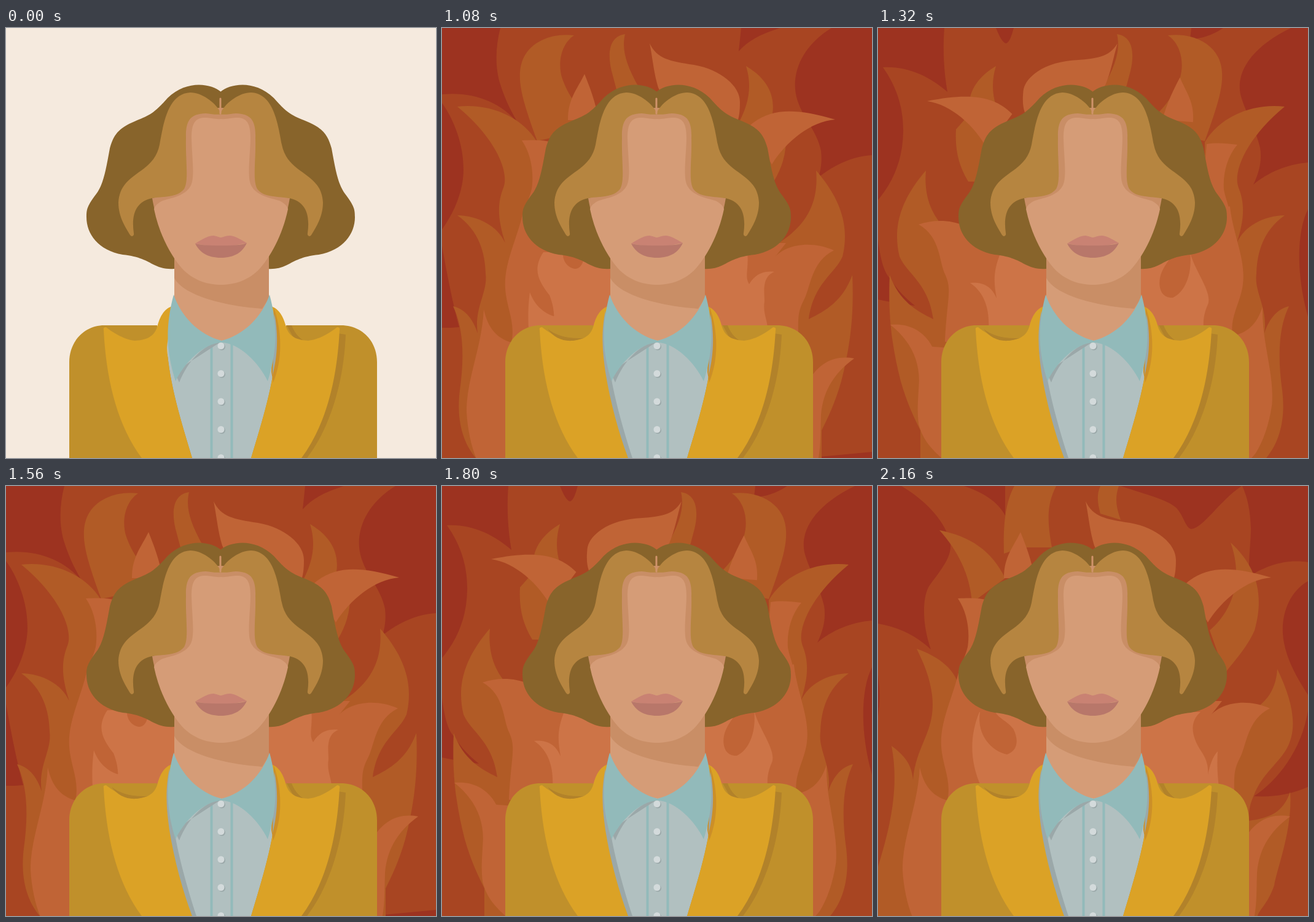
Animation, 700 px wide and 700 px high, one loop 2.28 s. Source, as an HTML page:

```html
<!DOCTYPE html>
<html lang="en">
<head>
<meta charset="utf-8">
<title>Portrait in flames</title>
<style>
html, body { margin: 0; width: 100%; height: 100%; overflow: hidden; background: #f5eade; }
svg { display: block; width: 100vw; height: 100vh; }
.base { fill: #a84522; }
.red { fill: #9d3320; }
.brown { fill: #b15b26; }
.orange { fill: #c06436; }
.light { fill: #cd7447; }
.skin { fill: #d59c77; }
.shade { fill: #c98e66; }
.collar { fill: #92baba; }
.grey { fill: #9ba8a9; }
.lapel { fill: #dba226; }
.fold { fill: #b2822a; }
</style>
</head>
<body>
<svg viewBox="0 0 700 700" preserveAspectRatio="none">
  <defs>
    <path id="hair" d="M350 104C335 91 295 83 263 114C238 143 230 143 205 154C180 165 174 178 169 196C162 235 158 255 147 270C132 290 131 295 131 308C131 335 150 362 190 369C218 372 228 379 242 386C252 391 262 393 274 392L350 330Z"/>
    <path id="fringe" d="M349 137C340 120 318 105 300 105C265 107 257 150 250 190C240 240 186 233 183 284C183 308 195 325 202 337C205 341 209 338 208 334C204 305 210 283 238 277C262 274 280 275 290 262C298 248 292 215 293 180C292 150 300 140 325 139C335 140 345 142 350 140Z"/>
    <path id="face" d="M350 130H285V265L238 277C246 325 268 372 290 395C308 412 330 418 350 418Z"/>
    <path id="glow" d="M350 148C340 149 335 146 322 146C305 147 302 160 302 180C303 215 308 245 300 258C290 275 265 277 253 282C245 287 242 290 241 295C250 338 270 374 290 395C308 412 330 418 350 418Z"/>
    <path id="lapel" d="M274 452C258 455 250 470 246 487C240 505 225 508 210 509C195 508 175 497 163 487C160 487 158 488 159 492C163 570 180 645 221 700H303C285 640 266 580 262 520C264 495 274 475 274 452Z"/>
    <path id="wing" d="M273 434C285 470 315 500 351 509V512C322 513 290 545 276 575C262 530 258 490 273 434Z"/>
  </defs>
  <g id="fire"></g>

  <use href="#hair" fill="#88642b"/>
  <use href="#hair" fill="#88642b" transform="matrix(-1 0 0 1 699 0)"/>
  <path class="skin" d="M274 360H428V480L351 520L274 480Z"/>
  <path class="shade" d="M274 360H428V440L417 457C360 453 290 437 274 407Z"/>
  <g class="shade"><use href="#face"/><use href="#face" transform="matrix(-1 0 0 1 700 0)"/></g>
  <g class="skin"><use href="#glow"/><use href="#glow" transform="matrix(-1 0 0 1 700 0)"/></g>
  <g fill="#b68540"><use href="#fringe"/><use href="#fringe" transform="matrix(-1 0 0 1 699 0)"/></g>
  <path d="M349 115V139" stroke="#cf936a" stroke-width="3" stroke-linecap="round"/>
  <path fill="#c98273" d="M308 351C322 342 330 338 338 338C345 339 347 341 350 341C353 341 357 338 364 338C372 338 380 343 392 350L350 358Z"/>
  <path fill="#b8776a" d="M308 351C320 355 380 356 392 350C385 365 372 374 350 374C328 374 315 365 308 351Z"/>

  <path fill="#c0902b" d="M103 700V544C103 510 128 484 160 484H246L300 640H400L456 484H545C580 484 604 510 604 544V700Z"/>
  <path fill="#b1c0c0" d="M262 490L351 509L440 490V520C436 580 417 640 399 700H303C285 640 266 580 262 520Z"/>
  <path class="fold" d="M540 497L553 499C550 580 525 655 490 700H475Z"/>
  <path class="fold" d="M457 484H465C469 495 475 502 483 508H470Z"/>
  <g class="lapel"><use href="#lapel"/><use href="#lapel" transform="matrix(-1 0 0 1 702 0)"/></g>
  <g id="cast">
    <path class="fold" d="M172 490C185 500 202 506 230 505C205 514 185 508 172 490Z"/>
    <path class="grey" d="M266 460C258 500 262 530 266 560C274 610 288 660 303 700H310C292 645 278 590 274 560Z"/>
  </g>
  <path fill="#cc8f28" d="M436 455C448 490 452 535 435 577L432 560Z"/>
  <path class="grey" d="M437 465C443 495 443 530 434 565Z"/>
  <path class="collar" d="M332.500 512H336.500V700H332.500ZM365.500 512H369.500V700H365.500Z"/>
  <path class="grey" d="M351 510C322 514 296 542 282 577L274 560Z"/>
  <g class="collar"><use href="#wing"/><use href="#wing" transform="matrix(-1 0 0 1 702 0)"/></g>
  <g id="buttons"></g>
</svg>
<script>
const flip = 'matrix(-1 0 0 1 687 0)';
const lean = 'matrix(-.995 -.0763 -.075 .942 728 27.5)';

const red = {
  low: 'M0 0H95C87 30 86 65 95 92C103 117 113 137 124 155C95 120 50 103 0 108ZM0 122C20 150 35 190 35 230C35 265 20 300 0 328Z' +
    'M487 0L483 38C500 18 525 8 550 0ZM634 0C585 30 568 75 577 112C585 145 610 165 617 200C619 220 616 232 613 243C640 222 668 209 700 207V0Z' +
    'M0 355C10 410 18 450 28 487C18 488 10 488 0 488ZM615 698L700 690V700H615Z',
  high: 'M0 0H108C105 40 108 75 113 104C85 80 50 62 8 64C30 95 42 130 41 170C40 215 25 250 0 280Z' +
    'M192 0C197 12 203 25 209 25C215 22 218 10 221 0ZM510 0L508 18C530 18 550 8 562 0Z' +
    'M672 0C600 35 580 80 592 115C600 140 615 165 622 195C626 220 618 240 611 255C635 235 665 222 700 219V0Z' +
    'M0 345C5 385 12 400 20 408C30 425 45 440 60 452C40 450 20 446 0 442ZM700 295C682 330 680 400 700 470Z',
  wide: 'M-13 0H38C80 25 112 60 118 95C120 120 95 145 82 165C72 185 72 225 86 266C60 242 30 227 -13 222Z' +
    'M140 0H207V48C195 25 170 10 140 0ZM395 0C440 15 470 22 485 35C498 48 500 68 510 70C530 68 555 25 592 0Z' +
    'M593 0H700V124C665 118 630 130 605 147C602 130 607 90 607 70C606 40 602 20 593 0Z' +
    'M700 155C672 170 657 205 659 240C661 275 680 310 700 340ZM612 505C650 480 690 430 700 365V490C670 503 640 507 612 505ZM0 308C4 335 3 355 0 375Z'
};

const brown = {
  tall: 'M25 128C75 122 130 143 155 186V700H55C30 670 24 630 29 590C36 540 36 490 18 453C40 458 52 478 58 497C52 455 75 430 71 400C70 365 60 330 25 305C60 306 90 322 103 350C90 310 90 285 100 260C110 235 88 180 25 128Z' +
    'M215 12C185 8 148 18 133 48C118 80 132 120 155 184L260 160C225 140 205 110 195 80C188 55 195 25 215 12Z' +
    'M298 10C270 14 270 45 276 70L284 100L320 96C300 60 292 35 298 10Z' +
    'M495 62C525 80 543 105 538 140L560 165C562 200 555 225 540 250H500L480 160C500 125 505 95 495 62Z' +
    'M609 232C655 285 662 330 652 372C640 400 605 415 597 474C625 460 652 445 668 402C671 470 664 520 650 575C640 610 628 635 618 655V700H500V380C545 350 617 325 609 232Z',
  wide: 'M100 72C150 82 185 105 207 150L153 190C150 145 130 105 100 72ZM222 0H290C275 30 275 55 283 100H235L205 110C204 75 205 30 222 0Z' +
    'M392 0H362C355 15 358 30 362 45L395 55C388 35 385 20 392 0ZM574 92C615 130 630 175 613 235C600 265 575 290 565 305L540 235C570 210 598 160 574 92Z' +
    'M63 265C100 278 128 300 132 330V700H0V620C20 555 35 490 22 423C45 440 55 455 57 478C62 420 95 400 88 340C84 310 75 290 63 265Z' +
    'M650 298C675 350 685 395 664 430C648 455 625 470 612 503C607 515 603 525 604 545C640 540 660 530 671 498C675 560 650 620 645 650C635 680 620 690 618 700H500V400C560 380 645 380 650 298Z'
};

const orange =
  'M338 25C350 50 370 54 410 60C455 68 485 95 485 120C485 135 484 145 480 155H380L352 97C345 75 343 50 338 25Z' +
  'M232 75C220 100 205 115 205 150H255C250 120 240 95 232 75ZM640 149C600 152 560 185 537 222L500 160C530 132 570 128 640 149Z' +
  'M130 183C145 205 150 235 146 262C143 275 137 285 134 300H180V186C165 182 150 182 130 183Z' +
  'M134 290C125 340 100 380 103 425C105 455 120 480 113 512C90 505 75 490 68 458C65 520 40 570 40 625C42 660 50 690 60 710C75 735 100 750 130 760H300V290Z' +
  'M638 362C600 380 600 425 588 445C575 470 582 483 580 560H430V350H560L538 378C555 352 600 345 638 362Z' +
  'M671 538C640 560 620 590 617 630C616 660 617 680 612 705C600 740 580 750 560 770V570H600C615 545 640 532 671 538Z';

// Light inner flames, with the curl cut out of them.
const light = {
  low: ['M165 365C145 395 160 415 175 435C183 455 183 470 182 490H275V365ZM143 430C140 455 140 470 141 490H185V470C165 465 150 450 143 430Z' +
    'M541 397C520 405 525 430 525 445C522 465 530 475 530 490H428V365H497C500 390 492 405 500 417C510 400 525 395 541 397Z',
    'M197 370C198 385 210 392 218 392C228 390 230 380 232 370Z'],
  high: ['M200 365C185 400 190 420 193 440C185 420 170 413 150 415C172 430 182 455 180 490H275V365ZM428 365H508C515 395 545 430 537 450C528 470 530 483 530 490H428Z',
    'M508 365C512 400 500 430 480 439C455 440 455 410 463 395C470 380 478 375 480 365Z'],
  wide: ['M165 368C150 405 148 445 168 490H275V365ZM428 368H525C505 385 512 410 525 430C535 445 538 455 537 470C540 455 545 440 553 432C552 450 552 465 555 490H428Z',
    'M166 368C160 405 185 432 210 437C230 430 228 410 220 395C210 382 195 378 190 366Z']
};

const shape = (cls, d, move = '') => `<path class="${cls}" d="${d}" transform="${move}"/>`;
const blaze = (...parts) => '<g><path class="base" d="M0 0H700V700H0Z"/>' + parts.join('') + '</g>';
const inner = ([body, curl], move) => shape('light', body, move) + shape('orange', curl, move);

const fire = document.getElementById('fire');
const cast = document.getElementById('cast');
fire.innerHTML = [
  blaze(shape('red', red.high), shape('brown', brown.tall, flip), shape('orange', orange, lean), inner(light.high)),
  blaze(shape('red', red.wide, flip), shape('brown', brown.wide, flip), shape('orange', orange, lean), inner(light.low, flip)),
  blaze(shape('red', red.low), shape('brown', brown.tall), shape('orange', orange), inner(light.low)),
  blaze(shape('red', red.wide), shape('brown', brown.wide), shape('orange', orange), inner(light.wide))
].join('');

document.getElementById('buttons').innerHTML = [518, 563, 608.5, 654, 700].map(y =>
  `<circle class="grey" cx="351.500" cy="${y + 1}" r="5.500"/><circle fill="#d3dadb" cx="350" cy="${y - .5}" r="5.500"/>`).join('');

const loop = 2280, calm = 840, step = 120;
const poses = [...fire.children];
const start = performance.now();

function draw() {
  const t = (performance.now() - start) % loop;
  const now = t < calm ? -1 : Math.floor((t - calm) / step) % poses.length;
  poses.forEach((pose, i) => pose.style.display = i === now ? '' : 'none');
  cast.style.display = now < 0 ? 'none' : '';
  requestAnimationFrame(draw);
}
draw();
</script>
</body>
</html>
```
